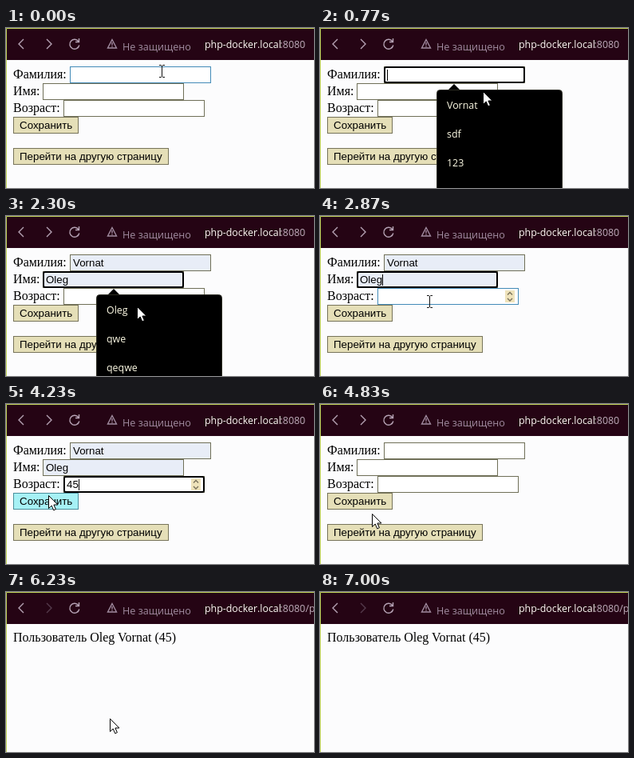
An HTML page that plays this animation: 386 by 200 pixels, repeating every 7.31 s.

```html
<!DOCTYPE html>
<html lang="ru">
<head>
<meta charset="utf-8">
<title>Форма</title>
<style>
html, body { margin: 0; width: 100%; height: 100%; overflow: hidden; background: #fcfcfd; }
svg { display: block; }
.serif { font: 16px "Liberation Serif", serif; }
.sans { font: 13.333px "Liberation Sans", sans-serif; }
.ui { font: 12.4px "Open Sans", sans-serif; }
.note { font-size: 12.6px; }
.strong { font-weight: 500; }
.line { fill: none; stroke-width: 1.4; }
</style>
</head>
<body>
<svg id="stage" width="386" height="200" viewBox="0 0 386 200"></svg>
<script>
const LOOP = 7310;
const LAST = 'Vornat', FIRST = 'Oleg', AGE = '45';
const FOCUS = [500, 1630, 3040];        // when each field is clicked
const PICK = [1270, 2770];              // when a suggestion is clicked
const TYPE = 3870, SENT = 4470, LEAVE = 5400, ARRIVE = 5570;
const fieldX = [80, 46, 72];
const labels = ['Фамилия:', 'Имя:', 'Возраст:'];

// Pointer moves: start, end, x, y
const moves = [
  [400, 770, 204, 79], [770, 1030, 188, 96], [1300, 1590, 157, 82],
  [1760, 2350, 164, 114], [2350, 2760, 148, 118], [2770, 2870, 137, 107],
  [3900, 4200, 53, 114], [4600, 5000, 72, 152], [5170, 5230, 75, 154],
  [6000, 6350, 150, 160], [6350, 6730, 246, 120], [6770, 6990, 306, 202]
];

const stage = document.getElementById('stage');
const pen = document.createElement('canvas').getContext('2d');
pen.font = '13.333px "Liberation Sans", sans-serif';

const between = (t, a, b) => t >= a && t < b;
const inside = (p, x, y, w, h) => between(p.x, x, x + w) && between(p.y, y, y + h);
const text = (x, y, cls, fill, s) => `<text x="${x}" y="${y}" class="${cls}" fill="${fill}">${s}</text>`;
const line = (d, color) => `<path class="line" d="${d}" stroke="${color}"/>`;
const rect = (x, y, w, h, attrs) => `<rect x="${x}" y="${y}" width="${w}" height="${h}" ${attrs}/>`;
const box = (x, y, w, h, fill, stroke) =>
  rect(x + .5, y + .5, w - 1, h - 1, `fill="${fill}" stroke="${stroke}"`);

function ease(u) {
  u = Math.min(1, Math.max(0, u));
  return u * u * (3 - 2 * u);
}

function pointerAt(t) {
  let x = 195, y = 54;
  for (const [from, to, toX, toY] of moves) {
    const k = ease((t - from) / (to - from));
    x += (toX - x) * k;
    y += (toY - y) * k;
  }
  return { x: Math.round(x), y: Math.round(y) };
}

function toolbar(t) {
  const icon = '#b5a2b4', dim = '#a18ca0', left = t >= LEAVE;
  const loading = between(t, 4400, 4560) || between(t, LEAVE, ARRIVE + 30);
  return rect(0, 0, 386, 40, 'fill="#250414"') +
    line('M22 14l-6 6 6 6', icon) +
    line('M51 14l6 6-6 6', left ? '#543a4c' : icon) +
    (loading ? line('M81.5 15.5l9 9m0-9l-9 9', '#b7a4e0')
      : line('M91 17a6 6 0 1 0 .8 4.5M91.5 13v4.5h-4.5', icon)) +
    line('M133 14.5l5.5 10.500h-11zM133 18v3.500m0 1v1.300', dim) +
    text(146, 27.5, 'ui note', dim, 'Не защищено') +
    text(249, 24.5, 'ui strong', '#fffdf6', 'php-docker.local') +
    text(343.5, 24.5, 'ui', '#c0aebc', left ? ':8080/page' : ':8080');
}

function field(i, value, hover, focused, caret) {
  const x = fieldX[i], y = 48 + 21 * i;
  let out = text(9, y + 15, 'serif', '#000', labels[i]) +
    box(x, y, 177, 21, i < 2 && value ? '#e8edf7' : '#fff', hover ? '#438bb8' : '#707058');
  if (i === 2 && (hover || focused))
    out += rect(232, 93, 12, 15, 'fill="#efe3bb"') +
      line('M235 98.5l3-3 3 3M235 103l3 3 3-3', '#78705a');
  if (focused)
    out += rect(x + 1, y + 1, 175, 19, 'rx="2" fill="none" stroke="#000" stroke-width="2"');
  if (caret)
    out += rect(Math.round(x + 4 + pen.measureText(value).width), y + 4, 1, 14, '');
  return out + text(x + 4, y + 15, 'sans', '#000', value);
}

function button(y, w, label, hover) {
  return box(9, y, w, 21, hover ? '#a6f1f5' : '#e5dfb8', hover ? '#4c8f9c' : '#77745a') +
    text(17, y + 15, 'sans', '#000', label);
}

function suggestions(x, y, tip, items) {
  return `<path d="M${tip - 8} ${y + 1}l8-8 8 8z"/>` +
    rect(x + .5, y + .5, 157, 140, 'rx="4" stroke="#2c2c22"') +
    items.map((s, i) => text(x + 13, y + 24 + 36 * i, 'ui strong', '#fffce6', s)).join('');
}

function form(t, p) {
  const sent = t >= SENT;
  const focus = sent ? -1 : FOCUS.filter(f => t >= f).length - 1;
  const menu = focus >= 0 && t < PICK[focus];
  const values = sent ? ['', '', ''] : [
    t >= 850 ? LAST : '',
    t >= 1950 ? FIRST : '',
    AGE.slice(0, Math.max(0, Math.ceil((t - TYPE) / 100)))
  ];
  const blinkFrom = [FOCUS[0], PICK[1], t < TYPE ? FOCUS[2] : TYPE][t >= FOCUS[2] ? 2 : t >= PICK[1] ? 1 : 0];
  const caret = Math.floor((t - blinkFrom) / 560) % 2 === 0;
  const hover = (x, y, w) => !menu && inside(p, x, y, w, 21);

  return values.map((v, i) =>
    field(i, v, hover(fieldX[i], 48 + 21 * i, 177), focus === i, focus === i && caret)).join('') +
    button(111, 82, 'Сохранить', hover(9, 111, 82)) +
    button(150, 195, 'Перейти на другую страницу', hover(9, 150, 195)) +
    (!menu ? '' : focus === 0
      ? suggestions(146, 77, 168, [LAST, 'sdf', '123'])
      : suggestions(113, 98, 135, [FIRST, 'qwe', 'qeqwe']));
}

function pointer(t, p) {
  const beam = t < 640 || between(t, 1540, 1900) || between(t, 2830, 3980);
  return `<g transform="translate(${p.x} ${p.y})">` + (beam
    ? '<path d="M-3 -7.500h2.500l1 1 1-1h2.500M.500 -7v14M-3 7.500h2.500l1-1 1 1h2.500" fill="none" stroke="#111"/>'
    : '<path d="M.500 .500v16l3.700-3.500 2.500 5.800 2.700-1.200-2.500-5.600h5z" fill="#fff" stroke="#000"/>') + '</g>';
}

function draw(t) {
  const p = pointerAt(t);
  stage.innerHTML = rect(0, 0, 386, 200, 'fill="#fcfcfd"') +
    (t < ARRIVE ? form(t, p) : text(9, 62, 'serif', '#000', `Пользователь ${FIRST} ${LAST} (${AGE})`)) +
    toolbar(t) +
    '<path d="M.5 200V.5H386" fill="none" stroke="#c3d75c"/>' +
    pointer(t, p);
}

const start = performance.now();
function tick() {
  draw((performance.now() - start) % LOOP);
  requestAnimationFrame(tick);
}
tick();
</script>
</body>
</html>
```
